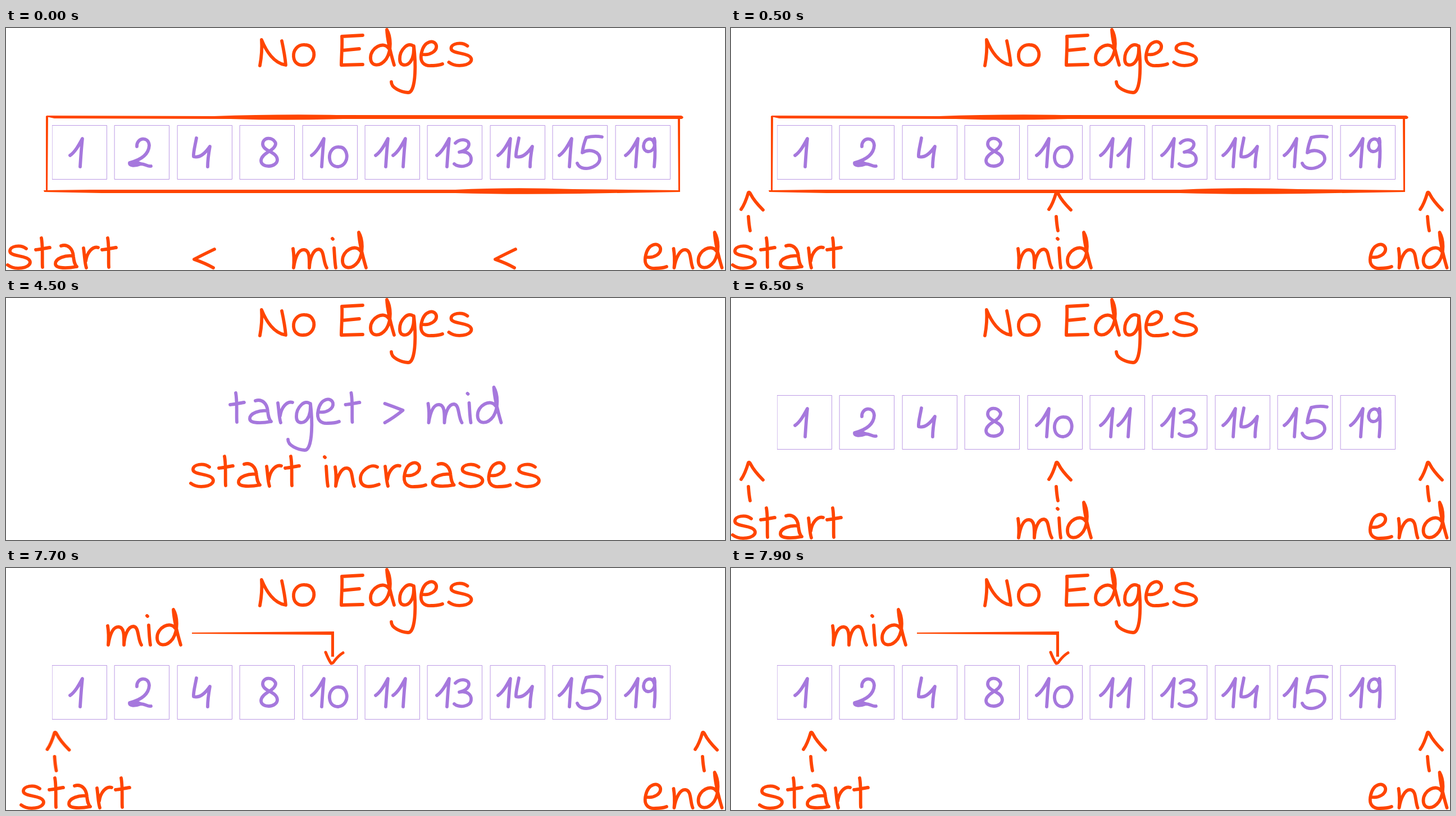
Recreate the animation shown at these times as an HTML page. Size 1280 by 431 pixels, loop 8 s.

```html
<!DOCTYPE html>
<html lang="en">
<head>
<meta charset="utf-8">
<title>No Edges</title>
<style>
html, body { margin: 0; width: 100%; height: 100%; overflow: hidden; background: #fff; }
svg { display: block; width: 100%; height: 100%; }
svg * { animation: 8s step-end infinite; }
.ink { fill: none; stroke-width: 5.8; stroke-linecap: round; stroke-linejoin: round; }
.red { stroke: #ff4500; }
.violet { stroke: #a678dd; }
.solid { fill: #ff4500; }
.word text { font: 60px "Noto Sans", sans-serif; fill: none; stroke: none; }
.cell { fill: none; stroke: #a678dd; stroke-width: 1; stroke-opacity: .75; }

.array { animation-name: array; }
.less { animation-name: less; }
.border { animation-name: border; }
.arrows { animation-name: arrows; }
.mid-below { animation-name: mid-below; }
.mid-above { animation-name: mid-above; }
.compare { animation-name: compare; }
.result { animation-name: result; }
.step-arrow { animation-name: step-arrow; }
.step-word { animation-name: step-word; }

@keyframes array { 0% { opacity: 1 } 31.25% { opacity: 0 } 81.25%, 100% { opacity: 1 } }
@keyframes less { 0% { opacity: 1 } 6.25%, 100% { opacity: 0 } }
@keyframes border { 0% { opacity: 1 } 31.25%, 100% { opacity: 0 } }
@keyframes arrows { 0% { opacity: 0 } 6.25%, 100% { opacity: 1 } }
@keyframes mid-below { 0% { opacity: 1 } 93.75%, 100% { opacity: 0 } }
@keyframes mid-above { 0% { opacity: 0 } 93.75%, 100% { opacity: 1 } }
@keyframes compare { 0% { opacity: 0 } 31.25% { opacity: 1 } 81.25%, 100% { opacity: 0 } }
@keyframes result { 0% { opacity: 0 } 56.25% { opacity: 1 } 81.25%, 100% { opacity: 0 } }
@keyframes step-arrow {
  0% { transform: none }
  93.75% { transform: translateX(0); animation-timing-function: steps(4) }
  98.75%, 100% { transform: translateX(111px) }
}
@keyframes step-word {
  0% { transform: none }
  93.75% { transform: translateX(0); animation-timing-function: steps(4) }
  98.75%, 100% { transform: translateX(48px) }
}
</style>
</head>
<body>
<svg viewBox="0 0 1280 431">
  <defs>
    <path id="arrow" d="M18 323C24 315 28 303 31 293Q33 292 35 296C41 308 50 317 57 324M31 336Q32 351 34 361"/>
  </defs>

  <g class="ink red" data-text="No Edges" data-x="449" data-y="69"></g>

  <g class="array">
    <g id="cells" class="ink violet"></g>
    <g class="border solid">
      <path d="M72 156L370 157Q480 153 600 155L1202 156Q1209 159 1203 162L600 162Q500 165 400 162L86 161L72 158Z"/>
      <path d="M71 157H75L74 290H71ZM1196 161H1200V290H1197Z"/>
      <path d="M67 289L150 288L800 288Q900 283 1010 287L1200 289V292L1020 295Q900 297 800 294L170 294L68 292Z"/>
    </g>
    <g class="ink red">
      <g class="step-word" data-text="start" data-x="0" data-y="430"></g>
      <g data-text="end" data-x="1134" data-y="430"></g>
      <g class="less">
        <g data-text="&lt;" data-x="331" data-y="430"></g>
        <g data-text="&lt;" data-x="867" data-y="430"></g>
      </g>
      <g class="arrows">
        <use class="step-arrow" href="#arrow"/>
        <use href="#arrow" x="1209"/>
      </g>
      <g class="mid-below">
        <g data-text="mid" data-x="507" data-y="430"></g>
        <g class="arrows"><use href="#arrow" x="548"/></g>
      </g>
      <g class="mid-above">
        <g data-text="mid" data-x="177" data-y="140"></g>
        <path class="solid" stroke="none" d="M331 115L584 113V158H579V119L450 118L331 117Z"/>
        <path stroke-width="5" d="M569 150Q574 163 579 170Q582 170 585 165Q592 156 600 151"/>
      </g>
    </g>
  </g>

  <g class="compare ink violet" data-text="target &gt; mid" data-x="396" data-y="225"></g>
  <g class="result ink red" data-text="start increases" data-x="326" data-y="338"></g>
</svg>

<script>
// Pen strokes per character: advance width, path with the baseline at y = 0.
const glyphs = {
  N: [59, "M3-2C6-18 7-34 6-48C14-28 28-6 49-3C48-16 45-32 42-46"],
  E: [52, "M41-56L4-54C5-36 3-18 3-3L41-4M4-29L35-32"],
  a: [50, "M14-42C26-46 35-37 36-23C37-14 38-9 42-5M36-24C22-26 4-20 4-10C4-1 26-2 42-5"],
  c: [44, "M34-37C22-44 3-30 4-15C5 0 20 0 37-6"],
  d: [52, "M35-33C26-46 3-34 3-16C3 0 20 1 31-14C41-30 39-54 32-66C33-45 40-20 45-3"],
  e: [50.5, "M7-22C18-20 33-27 31-38C28-49 10-47 5-26C0-6 12-1 22-2C30-2 37-3 42-5"],
  g: [37, "M28-36C18-46 3-30 3-14C3 0 16-1 22-9C28-17 28-27 28-37C30-20 31-5 30 12C29 32 25 46 18 46C5 45-12 38-12 27"],
  i: [18, "M3-55l1 1M6-38C7-25 7-15 9-3"],
  m: [71, "M4-37C6-25 6-15 5-3C8-22 14-36 24-35C34-34 33-18 33-3C34-20 40-36 50-36C60-35 57-14 64-3"],
  n: [45, "M4-37C6-25 6-15 5-3C8-22 16-36 25-35C36-34 33-15 38-3"],
  o: [50, "M24-39C11-40 3-29 4-18C5-6 14-2 22-3C34-3 42-14 40-26C37-36 31-39 24-39Z"],
  r: [34, "M4-38C6-25 6-12 9-3M8-15C10-30 20-42 30-39"],
  s: [50, "M36-37C26-45 6-42 7-32C8-22 42-26 43-13C43-2 16 2 3-8"],
  t: [34, "M13-56C16-40 14-15 15-4M3-35C12-36 20-38 28-39"],
  "<": [43, "M40-36Q15-24 4-18Q24-11 38-3"],
  ">": [40, "M3-37Q20-31 35-25Q19-12 3-3"],
  0: [38, "M21-38C10-39 3-29 4-18C5-7 12-3 19-3C31-4 37-16 34-27C32-34 28-38 21-38Z"],
  1: [31, "M3-23C12-29 19-42 25-53C23-35 22-18 21-3"],
  2: [45, "M17-39C16-55 38-58 39-41C38-24 24-15 4-10C3-4 14-4 24-8C32-8 36-3 42-4M5-8Q16-12 22-9"],
  3: [36, "M5-45C14-54 30-52 29-42C28-34 20-31 12-29C26-32 34-24 33-15C32-2 10-1 3-8"],
  4: [36, "M9-54C7-42 3-28 4-21C14-18 24-26 33-39C31-28 29-14 29-3"],
  5: [50, "M48-56C38-58 28-57 20-55C16-45 14-38 13-28C26-36 45-30 44-16C42 0 10 7 4-9"],
  8: [36, "M30-45C25-57 7-56 7-43C8-30 33-30 33-15C32-1 4 0 4-14C5-28 31-32 30-45Z"],
  9: [28, "M23-44C20-57 5-54 4-40C4-28 18-26 23-38C25-46 24-50 23-53C26-30 24-14 23-3"]
};
const SPACE = 36;

function svgNode(parent, tag, attrs) {
  const node = document.createElementNS("http://www.w3.org/2000/svg", tag);
  for (const key in attrs) node.setAttribute(key, attrs[key]);
  return parent.appendChild(node);
}

function write(parent, text, x, y) {
  const word = svgNode(parent, "g", { class: "word", transform: `translate(${x} ${y})` });
  // Invisible selectable text beneath the handwriting.
  svgNode(word, "text", {}).textContent = text;
  let pen = 0;
  for (const char of text) {
    if (char === " ") { pen += SPACE; continue; }
    const [advance, d] = glyphs[char];
    svgNode(word, "path", { d, transform: `translate(${pen})` });
    pen += advance;
  }
}

document.querySelectorAll("[data-text]").forEach(node =>
  write(node, node.dataset.text, node.dataset.x, node.dataset.y));

const cells = document.getElementById("cells");
const values = [[1, 111], [2, 216], [4, 330], [8, 450], [10, 541],
  [11, 655], [13, 764], [14, 873], [15, 982], [19, 1100]];
values.forEach(([value, x], i) => {
  svgNode(cells, "rect", {
    class: "cell", x: Math.round(82 + 111.4 * i) + 0.5, y: 173.5, width: 97, height: 96
  });
  write(cells, String(value), x, 250);
});
</script>
</body>
</html>
```
